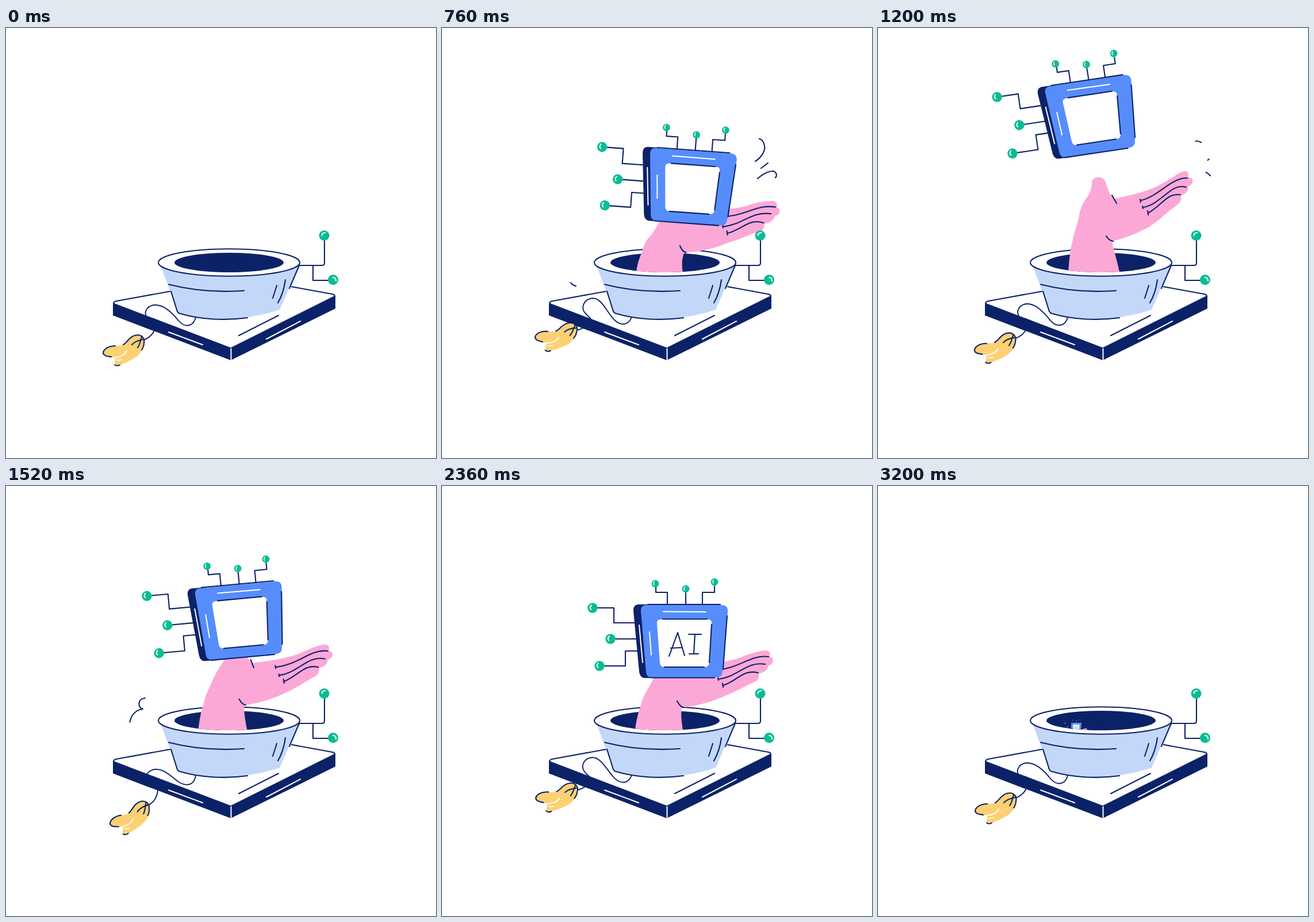
Animation of 748x748 px, one loop 3.28 s. Source, as an HTML page:

```html
<!DOCTYPE html>
<html lang="en">
<head>
<meta charset="utf-8">
<title>Hand and chip</title>
<style>
  html, body { margin: 0; width: 100%; height: 100%; overflow: hidden; background: #fff; }
  svg { display: block; width: 100%; height: 100%; }
  .line { fill: none; stroke: #0c2268; stroke-width: 2.1; stroke-linecap: round; stroke-linejoin: round; }
  .shine { fill: none; stroke: #fff; stroke-width: 2; stroke-linecap: round; }
  .navy { fill: #0c2268; }
  .white { fill: #fff; }
  .green { fill: #08bd92; }
  .pink { fill: #fca8d7; }
</style>
</head>
<body>
<svg viewBox="0 0 748 748">
  <defs>
    <clipPath id="mouth"><path d="M0 0H748V408H483A95 17 0 0 1 293 408H0Z"/></clipPath>
    <g id="node">
      <circle class="green" r="9"/>
      <path class="shine" d="M-4 0C-4 -3 -2 -5 2 -5"/>
    </g>
  </defs>

  <g id="platform">
    <path class="white" d="M187 478L391 430L572 465L391 557Z"/>
    <path class="line" d="M286 458L192 475Q187 476 187 480M497 450L568 463Q572 464 572 467"/>
    <path class="navy" d="M186 478L391 556L573 465V488L391 578L186 500Z"/>
    <path class="shine" d="M391.500 558V577M283 529L342 551M453 541L512 510"/>
    <path class="line" d="M405 535L474 500"/>
  </g>

  <path id="rope" class="line" style="stroke-width:1.900"/>
  <g id="tassel">
    <path fill="#fdd072" d="M240 543C239 534 228 532 220 537C212 543 209 550 203 552C192 553 172 553 169 565C170 572 180 572 190 573C191 577 188 582 189 586C197 589 212 580 222 575C234 568 241 558 240 543Z"/>
    <path class="line" d="M190 553C178 553 169 559 169 566C171 571 177 571 183 572M204 551C212 546 214 537 225 534.500C236 532 242 540 240 548C240 554 238 557 236 560M238 542C230 543 222 547 219 551M236 537C234 545 232 552 229 556M189 586C192 588 195 588 198 586"/>
    <path class="shine" d="M191 573C200 572 207 568 210 562M194 578L201 577"/>
  </g>

  <g id="bowl">
    <path fill="#c3d7f9" d="M270 416L299 495C340 510 410 512 476 490L510 412Z"/>
    <path class="line" d="M287 458L297 490Q298 495 302 496.500C340 508 385 509 420 504M510 413L493 453M283 446C325 457 370 460 414 457M471 448L464 470M486 438C484 453 480 466 473 478"/>
    <ellipse class="line" style="fill:#fff" cx="388" cy="408" rx="123" ry="23.700"/>
    <ellipse class="navy" cx="388" cy="408" rx="95" ry="17"/>
  </g>

  <g clip-path="url(#mouth)">
    <g id="actor">
      <path id="hand" class="pink"/>
      <path id="creases" class="line"/>
      <g id="chip">
        <path class="line" d="M271 212H299V238H336M301 266H338M282 313H319V287H341M372 176V185H392V207M424 186V207M474 174V185H453V207"/>
        <g id="pins"></g>
        <path class="navy" d="M341 206H362L372 334H352Q344 333 343 323L333 218Q332 207 341 206Z"/>
        <path fill="#568dfb" d="M356 207H486Q498 207 497 219L488 323Q487 333 477 333H365Q356 333 355 324L346 218Q345 207 356 207Z"/>
        <path class="line" d="M358 206H484M496 226L489 317M363 333.500H474"/>
        <path class="shine" d="M385 218.500L459 219M361 254L364 294M343 242L349 307"/>
        <path class="white" d="M381 232H462Q470 232 469 240L465 308Q464 315 457 315H387Q380 315 379 308L374 240Q373 232 381 232Z"/>
        <path class="line" d="M384 231.500H461M469 241L465 307M387 315H456"/>
        <path id="letters" class="line" role="img" aria-label="AI" d="M395 296L410 255L422 295M398 282L418 281M429 258H451M440 258L438 291M430 292H446"/>
      </g>
    </g>
  </g>

  <g id="antenna">
    <path class="line" d="M511 413H549Q554 413 554 409V370M534 413V439H562"/>
    <use href="#node" x="553.500" y="361"/>
    <use href="#node" transform="translate(569 438) rotate(90)"/>
  </g>

  <g id="rightMarks">
    <path class="line" pathLength="1" d="M545 232C556 225 563 213 561 205C559 192 547 189 544 195C542 203 551 206 552 199C552 194 558 197 562 199"/>
    <path class="line" pathLength="1" d="M555 244L576 228"/>
    <path class="line" pathLength="1" d="M549 262C558 254 567 249 576 249C585 252 583 262 574 263C566 263 565 252 570 251C574 252 576 255 578 257"/>
  </g>
  <path id="leftMark" class="line" pathLength="1"/>
</svg>

<script>
const LOOP = 3280, STEP = 40, LAST = 3200;
const $ = id => document.getElementById(id);

// [x, y, radius] of the pin heads
const pins = [[262, 212, 8.7], [293, 266, 8.7], [274, 313, 8.7], [371, 170, 6.4], [424, 179, 6.4], [474, 167, 6.4]];
$('pins').innerHTML = pins.map(([x, y, r]) =>
  `<use href="#node" transform="translate(${x} ${y}) scale(${r / 9}) rotate(-45)"/>`).join('');

const handRest = 'M334 440C337 410 341 395 345 385C350 365 354 360 360 350C368 335 376 320 384 310C393 300 393 292 396 286C401 280 414 280 418 286C424 297 426 306 436 312C460 310 500 306 520 298C537 291 550 287 563 286C570 286 572 292 570 297C577 298 577 306 574 309C572 311 569 312 567 313C568 318 562 325 551 326C552 333 550 338 543 341C525 349 513 357 490 366C470 375 440 384 417 385C415 400 417 412 419 424L421 440Z';
const handUp = 'M330 440C332 410 334 385 338 372C342 350 348 340 350 325C354 305 362 298 367 289C373 278 371 270 373 265C377 258 390 258 394 264C400 276 401 291 411 297C440 291 475 283 497 269C512 261 522 251 534 249C540 249 541 254 539 259C548 260 549 267 546 271C545 273 542 275 539 276C541 281 538 288 527 291C529 299 525 305 519 309C500 322 490 335 470 347C455 355 430 366 407 371C411 390 416 405 420 424L424 440Z';
const creaseRest = 'M473 318L474 323M474 321C520 317 535 293 568 297M480 334L481 338M481 336C515 332 530 304 562 310M488 343L489 350M489 347C515 338 525 318 550 325M433 306L437 320M409 374C412 380 415 384 420 385';
const creaseUp = 'M456 298L457 303M457 300C490 292 510 260 538 261M460 310L461 314M461 312C493 307 510 268 536 277M469 318L470 325M470 322C497 306 502 287 526 290M407 291L415 305M397 362C400 367 404 370 409 371';

const ropeMid = 'M330 503C326 520 311 522 300 509C285 490 270 480 256 482C243 485 240 496 245 504C250 512 262 515 257 528C253 536 247 540 239 543';
const ropeUp = 'M330 503C324 517 312 519 300 508C285 492 278 470 262 470C245 472 241 488 250 497C258 505 262 508 258 510C253 520 242 524 234 526';
const ropeDown = 'M330 503C328 518 318 524 302 516C285 504 275 491 258 493C250 495 246 499 245 502C250 508 266 515 264 530C262 545 255 551 247 556';

const hook = 'M233 449C222 446 216 434 215 415C216 400 225 389 238 388C229 386 228 370 242 369';
const hookLow = 'M235 444C222 442 215 432 215 420C215 405 222 393 238 397C228 393 230 378 242 374';

// Timed values: [ms, value]
const lift = [[0, 0], [460, 0], [600, -.17], [760, -.4], [840, -.55], [930, 0], [1200, 1], [1240, 1.02],
  [1520, .28], [1572, .05], [1720, -.42], [1790, -.55], [1960, -.1], [2160, 0], [LOOP, 0]];
const drift = [[0, 0], [930, 0], [1200, -18], [1520, -4], [1572, 0], [LOOP, 0]];
const twist = [[0, 0], [930, 0], [1200, 2], [1520, -2.3], [1572, 0], [LOOP, 0]];
const swing = [[0, 0], [80, -.02], [720, -1.03], [760, -1], [1200, -.17], [1520, 1], [1640, 1.22],
  [1960, .33], [2480, -1], [2540, -1.03], [2800, -.57], [3200, 0], [LOOP, 0]];
const flickHead = [[0, 0], [160, .57], [240, .77], [360, 1], [640, 1]];
const flickTail = [[0, 0], [180, 0], [240, .07], [600, .88], [640, 1]];
const hookHead = [[0, 0], [280, 1], [430, 1]];
const hookTail = [[0, 0], [190, 0], [290, .42], [430, 1]];

const flickStarts = [600, 1720];
const hookStarts = [704, 1230, 1904, 2610];

// Monotone cubic through the keys
function track(keys, t) {
  const n = keys.length - 1;
  if (t <= keys[0][0]) return keys[0][1];
  if (t >= keys[n][0]) return keys[n][1];
  const i = keys.findIndex(k => k[0] > t) - 1;
  const rate = j => j < 0 || j >= n ? 0 : (keys[j + 1][1] - keys[j][1]) / (keys[j + 1][0] - keys[j][0]);
  const slope = j => {
    const a = rate(j - 1), b = rate(j);
    return a * b > 0 ? 2 * a * b / (a + b) : 0;
  };
  const [t0, a] = keys[i], [t1, b] = keys[i + 1];
  const w = t1 - t0, p = (t - t0) / w, q = 1 - p;
  return a * q * q * (1 + 2 * p) + b * p * p * (3 - 2 * p)
    + slope(i) * w * p * q * q - slope(i + 1) * w * p * p * q;
}

const smooth = (a, b, t) => {
  const p = Math.min(1, Math.max(0, (t - a) / (b - a)));
  return p * p * (3 - 2 * p);
};

function morph(a, b, k) {
  const to = b.match(/-?[\d.]+/g);
  let i = 0;
  return a.replace(/-?[\d.]+/g, v => (+v + (to[i++] - v) * k).toFixed(2));
}

function trim(path, from, to) {
  const len = to - from;
  path.style.visibility = len > .004 ? 'visible' : 'hidden';
  path.style.strokeDasharray = `${Math.max(len, .001)} 3`;
  path.style.strokeDashoffset = -from;
}

function drawHand(t) {
  const k = track(lift, t);
  $('hand').setAttribute('d', morph(handRest, handUp, k));
  $('creases').setAttribute('d', morph(creaseRest, creaseUp, k));

  const flying = t > 930 && t < 1572;
  const x = -30 * k + track(drift, t);
  const y = flying ? -118 + .00114 * (t - 1250) ** 2 : -15 * k;
  const turn = -10.5 * k + track(twist, t);
  $('chip').setAttribute('transform', `translate(${x} ${y}) rotate(${turn} 415 270)`);
  $('letters').style.opacity = smooth(1820, 2110, t);

  const size = smooth(0, 460, t) * (1 - smooth(2840, 3300, t));
  $('actor').setAttribute('transform', `translate(334.5 440) scale(${size}) translate(-334.5 -440)`);
  $('actor').style.visibility = t < 80 ? 'hidden' : 'visible';
}

function drawTassel(t) {
  const v = track(swing, t), m = Math.abs(v), up = v < 0;
  const [x, y, turn] = up ? [-5, -20, 6] : [8, 13, -8];
  $('rope').setAttribute('d', morph(ropeMid, up ? ropeUp : ropeDown, m));
  $('tassel').setAttribute('transform', `translate(${x * m} ${y * m}) rotate(${turn * m} 239 541)`);
}

function drawMarks(t) {
  const flick = t - (flickStarts.findLast(s => s <= t) ?? t);
  for (const path of $('rightMarks').children)
    trim(path, track(flickTail, flick), track(flickHead, flick));

  const start = hookStarts.findLast(s => s <= t) ?? t;
  $('leftMark').setAttribute('d', start === hookStarts[3] ? hookLow : hook);
  trim($('leftMark'), track(hookTail, t - start), track(hookHead, t - start));
}

const begin = performance.now();
function draw() {
  const now = (performance.now() - begin) % LOOP;
  const t = Math.min(LAST, Math.floor(now / STEP) * STEP);
  drawHand(t);
  drawTassel(t);
  drawMarks(t);
  requestAnimationFrame(draw);
}
draw();
</script>
</body>
</html>
```
